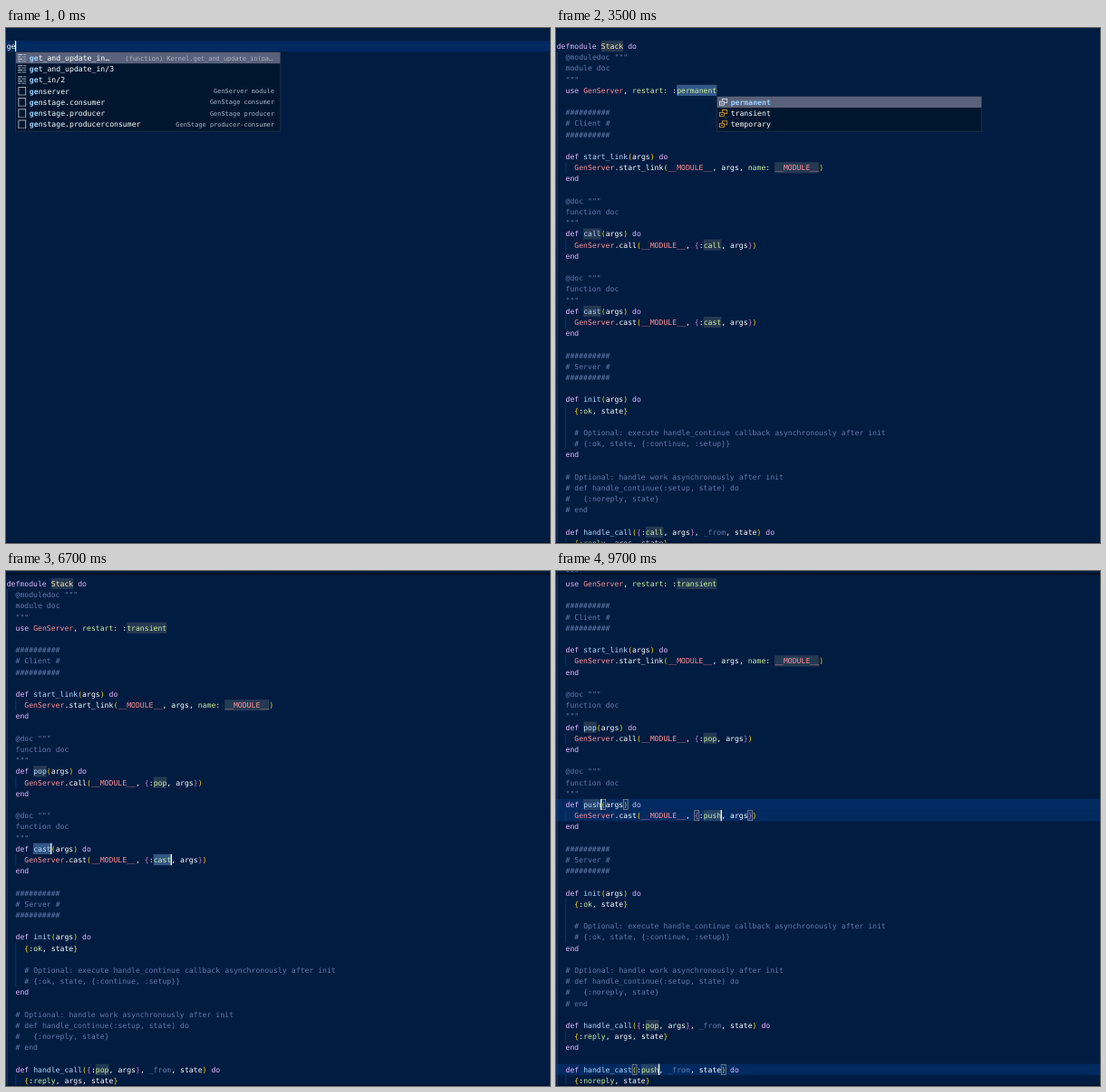
An HTML page with a canvas that plays this animation: 600x569 px, repeating every 9800 ms.

```html
<!DOCTYPE html>
<html lang="en">
<head>
<meta charset="utf-8">
<title>Snippet completion</title>
<style>
html, body { margin: 0; width: 100%; height: 100%; overflow: hidden; background: #001c41; }
canvas { display: block; }
</style>
</head>
<body>
<canvas id="stage" width="600" height="569"></canvas>
<script>
const ctx = document.getElementById('stage').getContext('2d');
const LOOP = 9800, W = 600, H = 569;
const LH = 12.2, CW = 4.907, X0 = 0.7, TOP = 14;
const FAMILY = '"DejaVu Sans Mono", Menlo, monospace';
const FONT = '8.15px ' + FAMILY, SMALL = '6.95px ' + FAMILY;
const C = {
  bg: '#001c41', line: '#002a60', text: '#ffffff', comment: '#6479ab', keyword: '#e6b4ff',
  name: '#b5d7ff', type: '#ffeba4', atom: '#cbef9f', module: '#ff8f96',
  brackets: ['#ffd700', '#c97bd0'], match: '#9ad2ff'
};

// $1..$5 are the snippet's tab stops
const template = `defmodule $1 do
  @moduledoc """
  module doc
  """
  use GenServer, restart: :$2

  ##########
  # Client #
  ##########

  def start_link(args) do
    GenServer.start_link(__MODULE__, args, name: $3)
  end

  @doc """
  function doc
  """
  def $4(args) do
    GenServer.call(__MODULE__, {:$4, args})
  end

  @doc """
  function doc
  """
  def $5(args) do
    GenServer.cast(__MODULE__, {:$5, args})
  end

  ##########
  # Server #
  ##########

  def init(args) do
    {:ok, state}

    # Optional: execute handle_continue callback asynchronously after init
    # {:ok, state, {:continue, :setup}}
  end

  # Optional: handle work asynchronously after init
  # def handle_continue(:setup, state) do
  #   {:noreply, state}
  # end

  def handle_call({:$4, args}, _from, state) do
    {:reply, args, state}
  end

  def handle_cast(:$5, _from, state) do
    {:noreply, state}
  end
end`.split('\n');

const completions = [
  ['get_and_update_in/2', '(function) Kernel.get_and_update_in(pa…'],
  ['get_and_update_in/3', ''],
  ['get_in/2', ''],
  ['genserver', 'GenServer module'],
  ['genstage.consumer', 'GenStage consumer'],
  ['genstage.producer', 'GenStage producer'],
  ['genstage.producerconsumer', 'GenStage producer-consumer']
];
const restartChoices = ['permanent', 'transient', 'temporary'];
const nameChoices = ['__MODULE__', '{:global, __MODULE__}', '{:via, Registry, __MODULE__}'];

// Timeline: each step changes part of the state; "key" restarts the caret blink
const steps = [];
const at = (time, change) => steps.push([time, change]);
function type(time, word, field, gap, more) {
  for (let i = 0; i < word.length; i++) {
    const now = time + i * gap;
    at(now, { ['v' + field]: word.slice(0, i + 1), sel: false, key: now, ...more });
  }
}
for (let i = 0; i < 5; i++) at(i * 100, { typed: 'genser'.slice(0, 2 + i), key: i * 100 });
at(800, { typed: '', field: 1, sel: true });
type(1600, 'Stack', 1, 100);
at(2500, { field: 2, sel: true });
at(2800, { choices: restartChoices, pick: 0 });
at(3800, { pick: 1 });
at(4200, { v2: 'transient', field: 3, choices: null, key: 4200 });
at(4400, { choices: nameChoices, pick: 0 });
at(5100, { field: 4, choices: null, key: 5100 });
type(5700, 'pop', 4, 200, { scroll: 6.1 });
at(6500, { field: 5, sel: true, key: 6500 });
type(7000, 'push', 5, 200, { scroll: 54.9 });

const initial = {
  v1: 'ModuleName', v2: 'permanent', v3: '__MODULE__', v4: 'call', v5: 'cast',
  scroll: 0, field: 0, sel: false, choices: null, pick: 0
};
const stateAt = t => Object.assign({}, initial, ...steps.filter(s => s[0] <= t).map(s => s[1]));

const colX = col => X0 + col * CW;
function box(x, y, w, h, color) {
  ctx.fillStyle = color;
  ctx.fillRect(x, y, w, h);
}
function frame(x, y, w, h, color) {
  ctx.strokeStyle = color;
  ctx.lineWidth = 0.8;
  ctx.strokeRect(x, y, w, h);
}
function write(text, x, top, color, font = FONT) {
  ctx.font = font;
  ctx.fillStyle = color;
  ctx.fillText(text, x, top + 9);
}

function tokenColor(token, prev, word) {
  if (/^(defmodule|def|use|do|end)$/.test(token)) return C.keyword;
  if (/^(GenServer|__MODULE__)$/.test(token)) return C.module;
  if (/^\w+:$/.test(token) || (prev === ':' && /\w/.test(token))) return C.atom;
  if (token === '_from') return C.comment;
  if (word === 'def') return C.name;
  return word === 'defmodule' ? C.type : C.text;
}

// Draws one line and returns its plain text and the span of the active tab stop
function drawLine(source, top, s) {
  const isComment = /^\s*(#|@|"""|module doc|function doc)/.test(source);
  const tokens = source.match(/\$\d|\w+:(?= )|\w+|#+|"+|./g) || [];
  let text = '', prev = '', word = '', depth = 0, span = null;
  for (const token of tokens) {
    const field = token[0] === '$' ? +token[1] : 0;
    const shown = field ? s['v' + field] : token;
    const x = colX(text.length);
    if (field) {
      const w = shown.length * CW;
      box(x, top, w, LH, 'rgba(124,124,124,.3)');
      if (field === s.field) {
        span = [text.length, text.length + shown.length];
        if (s.sel) box(x, top, w, LH, 'rgba(70,125,195,.45)');
      }
    }
    let color = isComment ? C.comment : tokenColor(shown, prev, word);
    if (!isComment && /[({]/.test(token)) color = C.brackets[depth++ % 2];
    if (!isComment && /[)}]/.test(token)) color = C.brackets[--depth % 2];
    if (shown !== ' ') write(shown, x, top, color);
    text += shown;
    if (token !== ' ') {
      prev = token;
      word = shown;
    }
  }
  return { text, span };
}

function drawBrackets(text, caret, top) {
  let open = caret;
  if (text[caret] !== '(') while (open >= 0 && !'({'.includes(text[open])) open--;
  if (open < 0) return;
  const close = text.indexOf(text[open] === '(' ? ')' : '}', open);
  for (const col of [open, close]) frame(colX(col), top + 0.6, CW, LH - 1.2, '#8a8f8c');
}

function drawIcon(kind, x, top, selected) {
  if (kind === 'snippet') {
    frame(x + 3.7, top + 1.8, 7.8, 8.6, '#c5ccd6');
    for (let i = 0; i < 3; i++) box(x + 5 + i * 2.2, top + 9.9, 1, 1, '#00162f');
  } else if (kind === 'value') {
    const color = selected ? '#e4e8ee' : '#dd9a2c';
    frame(x + 6.5, top + 2.6, 5.2, 4, color);
    box(x + 3, top + 5, 5.4, 4.8, selected ? '#59627a' : '#00162f');
    frame(x + 3.5, top + 5.4, 4.8, 4, color);
    box(x + 4.8, top + 7, 2.2, 0.8, color);
  } else {
    for (let i = 0; i < 4; i++) {
      box(x + 3, top + 2 + i * 2.4, i % 2 ? 3 : 5, 1, '#c5ccd6');
      box(x + (i % 2 ? 7 : 9), top + 2 + i * 2.4, i % 2 ? 5 : 3, 1, '#93a0b2');
    }
  }
}

function drawPopup(x, y, rows, pick, query) {
  const w = 293, h = rows.length * LH + 3;
  box(x, y, w, h, '#00162f');
  rows.forEach(([label, detail, kind], i) => {
    const top = y + 0.8 + i * LH, selected = i === pick;
    if (selected) box(x + 0.5, top, w - 1, LH, '#59627a');
    drawIcon(kind, x, top, selected);
    if (selected && detail.length > 30) label = label.slice(0, 17) + '…';
    const full = label.startsWith(query) || kind !== 'value';
    let matched = 0;
    [...label].forEach((ch, n) => {
      const hit = full && ch === query[matched];
      if (hit) matched++;
      write(ch, x + 15.6 + n * CW, top, hit ? C.match : C.text, (hit ? 'bold ' : '') + FONT);
    });
    if (detail && (selected || kind === 'snippet')) {
      ctx.textAlign = 'right';
      write(detail, x + (detail.length > 30 ? 284 : 285.7), top - 0.4, '#a9b4c2', SMALL);
      ctx.textAlign = 'left';
    }
  });
  frame(x + 0.4, y + 0.4, w - 0.8, h - 0.8, '#25344b');
}

const drawCaret = (col, top) => box(colX(col) - 0.6, top, 1.3, LH, '#ffffff');

function drawTyping(s, caretOn) {
  const { typed } = s;
  box(0, TOP, W, LH, C.line);
  write(typed, X0, TOP, C.text);
  if (caretOn) drawCaret(typed.length, TOP);
  const pattern = new RegExp('^' + [...typed].join('.*'));
  const rows = completions
    .filter(([label]) => pattern.test(label))
    .map(([label, detail]) => [label, detail, /\//.test(label) ? 'function' : 'snippet']);
  const rank = row => row[0].startsWith(typed) ? 0 : 1;
  rows.sort((a, b) => rank(a) - rank(b));
  drawPopup(colX(typed.length) - 0.3, TOP + LH, rows, 0, typed);
}

function drawCode(s, caretOn, t) {
  let popup = null;
  template.forEach((source, i) => {
    const top = TOP + i * LH - s.scroll;
    if (top < -LH || top > H) return;
    const active = source.includes('$' + s.field);
    if (active && !s.sel) box(0, top, W, LH, C.line);
    if (i && i < template.length - 1) box(0.8, top, 0.8, LH, '#2a4468');
    if (source.startsWith('    ') || i === 34) box(10.5, top, 0.8, LH, '#1f3a60');
    const { text, span } = drawLine(source, top, s);
    if (!span) return;
    if (!s.sel && t - s.key >= 100) drawBrackets(text, span[1], top);
    if (caretOn) drawCaret(span[1], top);
    popup = [colX(span[1]) - 0.3, top + LH];
  });
  if (s.choices) {
    const rows = s.choices.map(label => [label, '', 'value']);
    drawPopup(...popup, rows, s.pick, s['v' + s.field]);
  }
}

function draw(t) {
  const s = stateAt(t);
  const caretOn = (t - s.key) % 1000 < 500;
  ctx.textRendering = 'geometricPrecision';
  box(0, 0, W, H, C.bg);
  if (s.typed) drawTyping(s, caretOn);
  else drawCode(s, caretOn, t);
  if (s.scroll) {
    const shadow = ctx.createLinearGradient(0, 2, 0, 6);
    shadow.addColorStop(0, 'rgba(0,8,22,.7)');
    shadow.addColorStop(1, 'rgba(0,8,22,0)');
    box(0, 2, W, 4, shadow);
  }
  box(0, 567.5, W, 1.5, 'rgba(0,10,28,.35)');
}

const start = performance.now();
function tick() {
  draw((performance.now() - start) % LOOP);
  requestAnimationFrame(tick);
}
tick();
</script>
</body>
</html>
```
